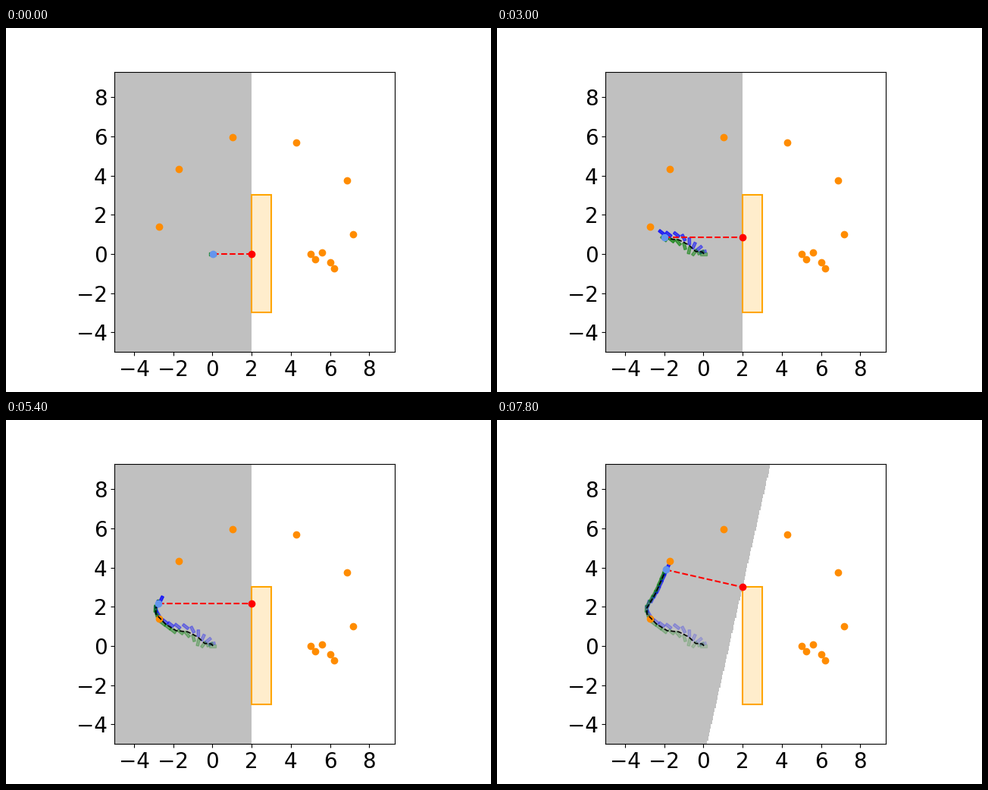
Recreate the animation shown at these times as a matplotlib script. Size 640 by 480 pixels, loop 8000 ms.

```python
import numpy as np
import matplotlib.pyplot as plt
from matplotlib.animation import FuncAnimation
from matplotlib.patches import Rectangle

STEPS = 40
LOW, HIGH = -5, 9.3
WALL_X, WALL_TOP = 2, 3
TURN_RATE = 13      # degrees of yaw per step
FADE = .955         # footprint opacity kept per step

GOALS = np.array([
    (5, 0), (5.23, -.27), (5.58, .08), (6, -.43), (6.2, -.73), (7.17, 1),
    (6.86, 3.74), (4.27, 5.68), (1.01, 5.95), (-1.73, 4.32), (-2.73, 1.39)])

# step, x, y of the body at the bends of its route
BENDS = np.array([
    (0, .02, 0), (2, -.05, .1), (5, -.4, .13), (8, -.75, .46), (11, -1.26, .72),
    (14, -1.85, .78), (18, -2.4, 1.12), (23, -2.88, 1.62), (25, -2.9, 1.92),
    (31, -2.46, 2.65), (39, -1.92, 3.89)])

steps = np.arange(STEPS)
path = np.column_stack([np.interp(steps, BENDS[:, 0], BENDS[:, i]) for i in (1, 2)])


def foot_pose(k):
    """Centre and yaw of the foot set down at step k; odd steps are right."""
    right = k % 2 == 1
    course = np.interp(k, [19, 26], [142, 64])
    ramp = min(1, k / 5)
    lead = ramp * (.25 if right else .13)
    side = ramp * np.interp(k, [8, 20], [.18, .03]) * (1 if right else -1)
    c, s = np.cos(np.radians(course)), np.sin(np.radians(course))
    x, y = path[k]
    return x + lead * c + side * s, y + lead * s - side * c, min(TURN_RATE * k, course)


def add_foot(k, length=.35, width=.13):
    x, y, yaw = foot_pose(k)
    foot = Rectangle((x - length / 2, y - width / 2), length, width, angle=yaw,
                     rotation_point="center", color="blue" if k % 2 else "green")
    return ax.add_patch(foot)


fig, ax = plt.subplots(figsize=(6.4, 4.8), dpi=100)
ax.tick_params(labelsize=20)

axis = np.linspace(LOW, HIGH, 300)
gx, gy = np.meshgrid(axis, axis)
safe = ax.imshow(np.zeros(gx.shape), extent=(LOW, HIGH, LOW, HIGH), origin="lower",
                 cmap="Greys", alpha=.25, vmin=0, vmax=1, interpolation="nearest")

ax.add_patch(Rectangle((WALL_X, -2.99), 1, 5.99, fc=(1, .647, 0, .2), ec="orange", lw=1.5))
feet = [add_foot(k) for k in steps]

ax.plot(*GOALS.T, "o", color="darkorange")
trail, = ax.plot([], [], "k--", lw=1.2)
ray, = ax.plot([], [], "r--", lw=1.5)
body, = ax.plot([], [], "o", color="cornflowerblue")
nearest, = ax.plot([], [], "ro")
ax.set(xlim=(LOW, HIGH), ylim=(LOW, HIGH),
       xticks=range(-4, 9, 2), yticks=range(-4, 9, 2))


def update(n):
    x, y = path[n]
    wy = min(y, WALL_TOP)
    dx, dy = WALL_X - x, wy - y
    # everything on the body's side of the line through the nearest wall point
    safe.set_data((dx * (gx - WALL_X) + dy * (gy - wy) <= 0).astype(float))
    for k, foot in enumerate(feet):
        foot.set_visible(k <= n)
        foot.set_alpha(.75 * FADE ** max(n - k, 0))
    trail.set_data(*path[:n + 1].T)
    ray.set_data([x, WALL_X], [y, wy])
    body.set_data([x], [y])
    nearest.set_data([WALL_X], [wy])
    return [safe, trail, ray, body, nearest]


anim = FuncAnimation(fig, update, frames=STEPS, interval=200, repeat=True,
                     repeat_delay=0, blit=False)
plt.show()
```
